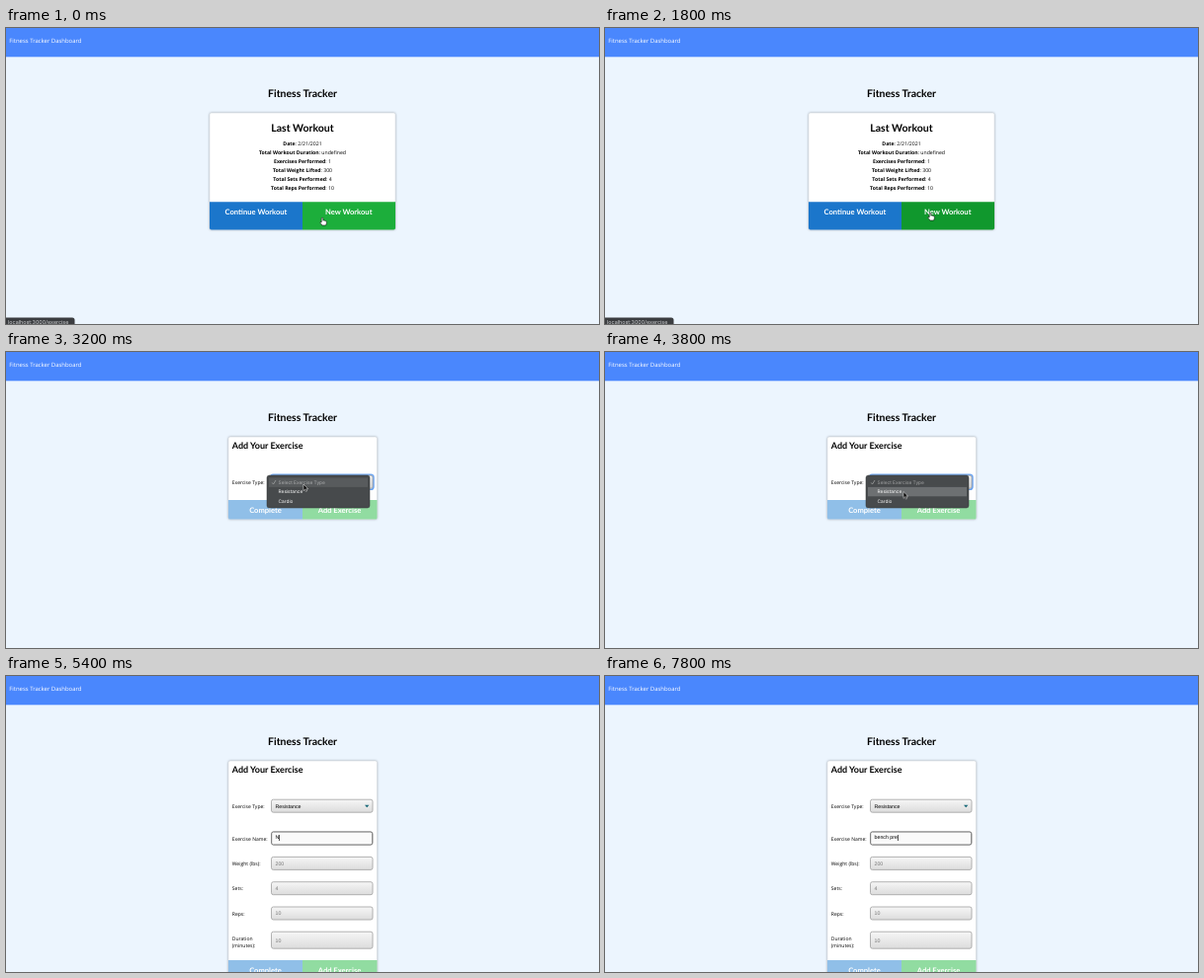
Recreate the animation shown at these times as an HTML page. Size 600 px wide and 300 px high, loop 8000 ms.

```html
<!DOCTYPE html>
<html lang="en">
<head>
<meta charset="utf-8">
<title>Fitness Tracker</title>
<style>
  html, body { margin: 0; width: 100%; height: 100%; overflow: hidden; background: #ecf5fe; }
  body { position: relative; text-rendering: geometricPrecision; }
  svg { position: absolute; left: 0; top: 0; display: block; }

  .title { font: 700 10.5px Lato, sans-serif; }
  .sub { font: 700 9px Lato, sans-serif; }
  .btn { font: 700 7.6px Lato, sans-serif; fill: #fff; }
  .nav { font: 5.95px "Open Sans", sans-serif; fill: #fff; }
  .stat { font: 5.17px "Open Sans", sans-serif; }
  .stat tspan { font-weight: 700; }
  .label { font: 5.05px "Open Sans", sans-serif; }
  .input, .typed { font: 5.25px "Liberation Sans", Arial, sans-serif; }
  .hint { fill: #777; }
  .menu-text { font: 4.8px Inter, sans-serif; fill: #fff; }
  .mid { text-anchor: middle; }
  .card { fill: #fff; stroke: #cdd3d9; stroke-width: .5; filter: drop-shadow(0 .6px 1px #0004); }

  /* One shared 8 s clock; the screen refreshes in 200 ms (2.5%) steps. */
  .anim, .typed::before { animation: 8s step-end infinite; }
  .home { animation-name: home; }
  .status { animation-name: status; }
  .press { animation-name: press; }
  .form { animation-name: form; }
  .short { animation-name: short; }
  .long { animation-name: long; }
  .ring { animation-name: ring; }
  .menu { animation-name: menu; }
  .pick-first { animation-name: pick-first; }
  .pick-second { animation-name: pick-second; }
  .focus { animation-name: focus; }
  .ghost { animation-name: ghost; }
  .cursor { animation-name: cursor; }
  .hand { animation-name: home; }
  .arrow { animation-name: arrow; }
  .beam { animation-name: beam; }

  @keyframes home { 0% { opacity: 1 } 25% { opacity: 0 } }
  @keyframes status { 0% { opacity: 1 } 27.5% { opacity: 0 } }
  @keyframes press { 0% { fill: #1cae3b } 22.5% { fill: #10982d } }
  @keyframes form { 0% { opacity: 0 } 25% { opacity: 1 } }
  @keyframes short { 0% { opacity: 1 } 52.5% { opacity: 0 } }
  @keyframes long { 0% { opacity: 0 } 52.5% { opacity: 1 } }
  @keyframes ring { 0% { opacity: 0 } 37.5% { opacity: 1 } 60% { opacity: 0 } }
  @keyframes menu { 0% { opacity: 0 } 37.5% { opacity: 1 } 52.5% { opacity: 0 } }
  @keyframes pick-first { 0% { opacity: 1 } 42.5% { opacity: 0 } }
  @keyframes pick-second { 0% { opacity: 0 } 42.5% { opacity: 1 } }
  @keyframes focus { 0% { opacity: 0 } 60% { opacity: 1 } }
  @keyframes ghost { 0% { opacity: 1 } 67.5% { opacity: 0 } 72.5% { opacity: 1 } 75% { opacity: 0 } }
  @keyframes arrow { 0% { opacity: 0 } 25% { opacity: 1 } 55% { opacity: 0 } }
  @keyframes beam { 0% { opacity: 0 } 55% { opacity: 1 } 67.5% { opacity: 0 } }
  @keyframes cursor {
    0% { transform: translate(320px, 192px) }
    2.5% { transform: translate(322px, 191px) }
    5% { transform: translate(324px, 190px) }
    7.5% { transform: translate(326px, 189px) }
    12.5% { transform: translate(327px, 188px) }
    17.5% { transform: translate(329px, 187px) }
    27.5% { transform: translate(318px, 166px) }
    30% { transform: translate(305px, 140px) }
    32.5% { transform: translate(300.5px, 130.5px) }
    40% { transform: translate(301px, 134px) }
    42.5% { transform: translate(301px, 138px) }
    45% { transform: translate(302px, 140px) }
    47.5% { transform: translate(302px, 141.5px) }
    52.5% { transform: translate(300px, 147px) }
    55% { transform: translate(292.5px, 157.5px) }
    57.5% { transform: translate(292.5px, 161px) }
    60% { transform: translate(292.5px, 164px) }
  }

  .typed { position: absolute; left: 272.6px; top: 158px; line-height: 13px; white-space: pre; }
  .typed::before { content: ""; border-right: 1px solid #555; animation-name: type; }
  @keyframes type {
    0% { content: "" }
    67.5% { content: "N" }
    72.5% { content: "" }
    75% { content: "b" }
    77.5% { content: "be" }
    80% { content: "ben" }
    82.5% { content: "benc" }
    85% { content: "bench" }
    90% { content: "bench " }
    92.5% { content: "bench p" }
    95% { content: "bench pr" }
    97.5% { content: "bench pre" }
  }
</style>
</head>
<body>
<svg width="600" height="300" viewBox="0 0 600 300">
  <defs>
    <linearGradient id="shade" x2="0" y2="1">
      <stop stop-color="#f6f6f6"/><stop offset="1" stop-color="#dcdcdc"/>
    </linearGradient>
    <rect id="field" x="268.5" width="102.5" height="13" rx="2" fill="url(#shade)" stroke="#a0a0a0" stroke-width=".8"/>
    <g id="buttons">
      <path d="M225 0H300V19.5H226.5Q225 19.5 225 18Z" fill="#90bfe8"/>
      <path d="M300 0H375.5V18Q375.5 19.5 374 19.5H300Z" fill="#91dca1"/>
      <g class="btn mid">
        <text x="262.5" y="12.6">Complete</text>
        <text x="337.5" y="12.6">Add Exercise</text>
      </g>
    </g>
  </defs>

  <rect width="600" height="300" fill="#ecf5fe"/>
  <rect width="600" height="29.3" fill="#4a87fd"/>
  <text class="nav" x="3.3" y="15">Fitness Tracker Dashboard</text>
  <text class="title mid" x="300" y="69.8">Fitness Tracker</text>

  <g class="anim home">
    <rect class="card" x="206" y="86" width="188" height="118.5" rx="1.8"/>
    <text class="title mid" x="300" y="105.3">Last Workout</text>
    <g class="stat mid">
      <text x="300" y="119"><tspan>Date</tspan>: 2/21/2021</text>
      <text x="300" y="127.9"><tspan>Total Workout Duration</tspan>: undefined</text>
      <text x="300" y="136.8"><tspan>Exercises Performed</tspan>: 1</text>
      <text x="300" y="145.7"><tspan>Total Weight Lifted</tspan>: 300</text>
      <text x="300" y="154.6"><tspan>Total Sets Performed</tspan>: 4</text>
      <text x="300" y="163.5"><tspan>Total Reps Performed</tspan>: 10</text>
    </g>
    <path d="M206 176.3H300V204.5H207.8Q206 204.5 206 202.7Z" fill="#1b76cb"/>
    <path class="anim press" d="M300 176.3H394V202.7Q394 204.5 392.2 204.5H300Z"/>
    <g class="btn mid">
      <text x="253" y="188.7">Continue Workout</text>
      <text x="346.7" y="188.7">New Workout</text>
    </g>
  </g>

  <g class="anim form">
    <g class="anim short">
      <rect class="card" x="225" y="86" width="150.5" height="83.5" rx="1.8"/>
      <use href="#buttons" y="150"/>
    </g>
    <g class="anim long">
      <rect class="card" x="225" y="86" width="150.5" height="221.5" rx="1.8"/>
      <use href="#buttons" y="288"/>
    </g>
    <text class="sub" x="228.8" y="98.3">Add Your Exercise</text>
    <text class="label" x="228.8" y="133.8">Exercise Type:</text>
    <rect class="anim ring" x="267.6" y="124.2" width="104.3" height="15" rx="2.8" fill="none" stroke="#6ba4f2" stroke-width="1.6"/>
    <use href="#field" y="125.2"/>
    <path d="M363 130.8H367.4L365.2 133.2Z" fill="#176878"/>
    <text class="anim short input" x="272.5" y="133.6">Select Exercise Type</text>

    <g class="anim long">
      <text class="input" x="272.5" y="133.6">Resistance</text>
      <g class="label">
        <text x="228.8" y="166.6">Exercise Name:</text>
        <text x="228.8" y="192">Weight (lbs):</text>
        <text x="228.8" y="217.3">Sets:</text>
        <text x="228.8" y="242.6">Reps:</text>
        <text x="228.8" y="268">Duration</text>
        <text x="228.8" y="275">(minutes):</text>
      </g>
      <use href="#field" y="158"/>
      <use href="#field" y="183.4"/>
      <use href="#field" y="208.7"/>
      <use href="#field" y="234"/>
      <rect x="268.5" y="259.2" width="102.5" height="17" rx="2" fill="url(#shade)" stroke="#a0a0a0" stroke-width=".8"/>
      <rect class="anim focus" x="268.7" y="158" width="102" height="13" rx="1.8" fill="#fafafa" stroke="#757575"/>
      <g class="input hint">
        <text class="anim ghost" x="272.5" y="166.4">Bench Press</text>
        <text x="272.5" y="191.8">200</text>
        <text x="272.5" y="217.1">4</text>
        <text x="272.5" y="242.4">10</text>
        <text x="272.5" y="269.6">10</text>
      </g>
    </g>

    <g class="anim menu">
      <rect x="264" y="125" width="104" height="33" rx="2.5" fill="#474a4c" stroke="#35383a" stroke-width=".5"/>
      <rect class="anim pick-first" x="266" y="127.5" width="100" height="9.4" fill="#585b5d"/>
      <rect class="anim pick-second" x="266" y="136.9" width="100" height="9.4" fill="#6d7072"/>
      <path d="M269.2 132.4L270.5 134L273 130" fill="none" stroke="#a0a2a3" stroke-width=".8"/>
      <g class="menu-text">
        <text x="275.6" y="133.8" fill-opacity=".5">Select Exercise Type</text>
        <text x="275.6" y="143.3">Resistance</text>
        <text x="275.6" y="152.7">Cardio</text>
      </g>
    </g>
  </g>

  <g class="anim status">
    <path d="M0 293.5H67Q69.5 293.5 69.5 296V300H0Z" fill="#3b3d40"/>
    <text x="2" y="300.3" fill="#d0d2d4" font-family="Inter, sans-serif" font-size="5.4">localhost:3000/exercise</text>
  </g>
</svg>

<span class="anim focus typed"></span>

<svg width="600" height="300" viewBox="0 0 600 300">
  <g class="anim cursor">
    <path class="anim hand" d="M-.8.7Q0-.5.8.7V3.2Q1.6 2.6 2.2 3.3 2.9 2.9 3.4 3.6 4.3 3.4 4.3 4.4V5.8Q4.2 7 3.5 8H-.2Q-1.2 6.3-2.3 5-2.3 3.9-.8 4.9Z" fill="#fff" stroke="#111" stroke-width=".6"/>
    <path class="anim arrow" d="M0 0V6.6L1.5 5.2 2.5 7.4 3.6 6.9 2.6 4.8H4.6Z" fill="#000" stroke="#fff" stroke-width=".5"/>
    <path class="anim beam" d="M-1.4-3.4Q0-3.4 0-2.6 0-3.4 1.4-3.4M0-2.6V2.8M-1.4 3.5Q0 3.5 0 2.8 0 3.5 1.4 3.5M-.8 1.2H.8" fill="none" stroke="#222" stroke-width=".8"/>
  </g>
</svg>
</body>
</html>
```
